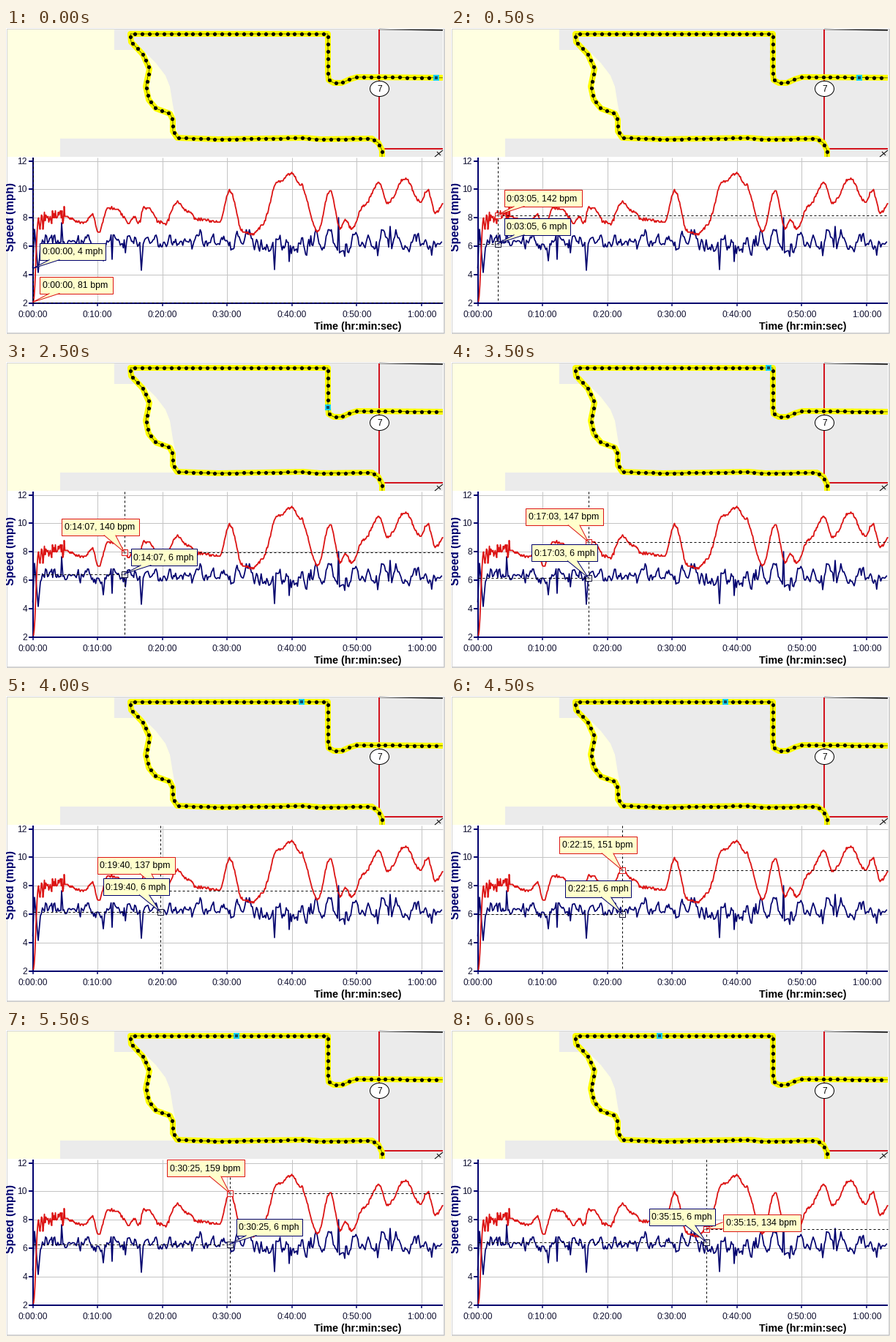
A matplotlib script that plays this animation: 600 px wide and 418 px high, repeating every 6.5 s.

```python
import numpy as np
import matplotlib.pyplot as plt
from matplotlib.animation import FuncAnimation
from matplotlib.patches import Ellipse, Polygon, Rectangle

W, H, DPI = 600, 418, 100
PX = 72 / DPI
NAVY, RED, GRID, NOTE, INK = "#00006e", "#dc1414", "#c4c4c4", "#ffffcc", "#101030"
LEFT, RIGHT, TOP, BASE = 36.5, 597, 177, 376
PER_MIN, PER_MPH = 8.858, 19.44

plt.rcParams["font.family"] = "Liberation Sans"
fig = plt.figure(figsize=(W / DPI, H / DPI), dpi=DPI, facecolor="white")
ax = fig.add_axes([0, 0, 1, 1])
ax.set_xlim(0, W)
ax.set_ylim(H, 0)
ax.axis("off")


def line(xs, ys, color, width=1.0, z=2, **kw):
    kw.setdefault("solid_capstyle", "butt")
    return ax.plot(xs, ys, color=color, lw=width * PX, zorder=z, **kw)[0]


def rect(x, y, w, h, face, edge="none", z=1):
    return ax.add_patch(Rectangle((x, y), w, h, facecolor=face, edgecolor=edge,
                                  lw=PX, zorder=z))


def text(x, y, s, size, color="black", z=6, **kw):
    return ax.text(x, y, s, fontsize=size * PX, color=color, zorder=z, **kw)


def time_x(sec):
    return LEFT + sec / 60 * PER_MIN


def speed_y(mph):
    return BASE - (mph - 2) * PER_MPH


def pulse_y(bpm):
    return BASE - (bpm - 80) * PER_MPH / 10


def eased(x, keys):
    """Cosine easing from one turning point to the next."""
    kx, ky = np.array(sorted(keys)).T
    i = np.clip(np.searchsorted(kx, x) - 1, 0, len(kx) - 2)
    t = np.clip((x - kx[i]) / (kx[i + 1] - kx[i]), 0, 1)
    return ky[i] + (ky[i + 1] - ky[i]) * (1 - np.cos(np.pi * t)) / 2


# Cursor stops: seconds, heart rate, speed, side of each note.
STOPS = [(0, 81, 4.45, "right", "right"), (185, 142, 6.2, "right", "right"),
         (370, 141, 6.4, "right", "right"), (555, 142, 6.17, "left", "right"),
         (700, 147, 6.3, "left", "right"), (847, 140, 6.46, "left", "right"),
         (935, 141, 6.2, "left", "right"), (1023, 147, 6.17, "left", "left"),
         (1180, 137, 6.17, "left", "left"), (1335, 151, 6.06, "left", "left"),
         (1532, 139, 6.73, "left", "right"), (1825, 159, 6.3, "left", "right"),
         (2115, 134, 6.46, "beside", "left")]

rng = np.random.default_rng(5)

# Heart rate: eased turning points with a small jitter in whole beats.
TURNS = [(37.5, 374), (44, 264), (80, 258), (107, 266), (126, 280), (154, 248),
         (167, 267), (182, 266), (194, 246), (217, 267), (247, 249), (272, 262),
         (291, 266), (324, 279), (337, 282), (372, 210), (391, 199), (402, 214),
         (426, 277), (443, 222), (457, 273), (464, 262), (472, 274), (489, 243),
         (510, 211), (521, 239), (546, 206), (566, 238), (576, 222), (587, 252),
         (598, 241)]
bx = np.arange(LEFT + 1, RIGHT + 1)
by = eased(bx, TURNS + [(time_x(s[0]), pulse_y(s[1])) for s in STOPS[3:]])
by += rng.normal(0, 1, len(bx)) * np.where((bx > 44) & (bx < 80), 7, 1)
step = PER_MPH / 10
by = BASE - step * np.round((BASE - by) / step)

# Speed: quick noise over a slow wander that grows later, plus a few spikes.
SPIKES = [(39, 275), (44, 334), (76, 266), (133, 318), (145, 316), (185, 331),
          (367, 330), (387, 319), (454.5, 259), (463, 312), (508, 311),
          (525, 271)]
pins = np.array(SPIKES + [(time_x(s[0]), speed_y(s[2])) for s in STOPS])
sx = np.arange(47, RIGHT, 1.4)
sx = sx[np.abs(sx[:, None] - pins[:, 0]).min(axis=1) > 1]
quick = np.convolve(rng.laplace(0, 5.5, len(sx)), [0.2, 0.6, 0.2], "same")
slow = np.convolve(rng.normal(0, 1, len(sx)), np.hanning(9) / 1.7, "same")
sy = 291.5 + np.clip(quick + slow * np.interp(sx, [300, 380], [3, 8]), -16, 19)
sx, sy = np.append(sx, pins[:, 0]), np.append(sy, pins[:, 1])
order = np.argsort(sx)
sx, sy = sx[order], sy[order]

# Map
rect(1, 1, 596, 175, "#ebebeb", z=0)
ax.add_patch(Polygon([(1, 1), (148, 1), (148, 30), (187, 30), (205, 48),
                      (218, 65), (224, 80), (228, 105), (232, 125),
                      (234, 151), (74, 151), (74, 176), (1, 176)],
                     facecolor="#ffffe1", zorder=1))
line([510, RIGHT], [1.5, 3], "black", 1.5)
line([510, 510, RIGHT], [1, 165, 165], "#d2141e", 2)
line([586, 597], [176, 167], "black", 1)
line([589, 594], [169, 174], "black", 1)

ROUTE = [(600, 68), (480, 67), (470, 70), (459, 75), (448, 75), (441, 71),
         (440, 62), (440, 8), (170, 8), (171, 19), (187, 36), (196, 56),
         (191, 80), (195, 98), (205, 110), (224, 117), (228, 125), (228, 141),
         (234, 150), (290, 152), (407, 150), (430, 152), (500, 151),
         (509, 157), (514, 167), (514, 176)]
rx, ry = np.array(ROUTE, float).T
dist = np.concatenate([[0], np.cumsum(np.hypot(np.diff(rx), np.diff(ry)))])


def dot_at(i):
    s = 12 + 9.93 * i
    return np.interp(s, dist, rx), np.interp(s, dist, ry)


map_clip = Rectangle((1, 1), 596, 175, transform=ax.transData)
dots = np.transpose(dot_at(np.arange(int((dist[-1] - 12) / 9.93) + 1)))
for part in (line(rx, ry, "#ffff00", 8, 3, solid_joinstyle="round"),
             line(rx, ry, "black", 0.6, 4),
             line(dots[:, 0], dots[:, 1], "black", 0, 5, ls="", marker="o",
                  ms=5.2 * PX, mew=0)):
    part.set_clip_path(map_clip)
ax.add_patch(Ellipse((510.5, 83), 26, 21, facecolor="white",
                     edgecolor="black", lw=PX, zorder=6))
text(510.5, 87, "7", 12, ha="center", z=7)

# Chart
for mph in range(2, 13, 2):
    y = speed_y(mph)
    if mph > 2:
        line([LEFT, RIGHT], [y, y], GRID)
    line([31, LEFT], [y, y], NAVY, 2)
    text(29, y + 4, str(mph), 12, INK, ha="right")
for ten in range(7):
    x = time_x(ten * 600)
    if ten:
        line([x, x], [TOP, BASE], GRID)
    line([x, x], [BASE, 380], NAVY, 1.5)
    text(x, 395, f"{ten // 6}:{ten % 6}0:00", 12, INK, ha="center")
line([LEFT, LEFT], [TOP, BASE + 1], NAVY, 2, 3)
line([LEFT - 1, RIGHT], [BASE, BASE], NAVY, 2, 3)
text(421, 412, "Time (hr:min:sec)", 14.2, weight="bold")
text(7, 258, "Speed (mph)", 15.5, NAVY, weight="bold", rotation=90,
     ha="center", va="center")
line(sx, sy, NAVY, 1.7, 4, solid_joinstyle="round")
line(bx, by, RED, 1.8, 4, solid_joinstyle="round")

# Panel edge
line([0.5, 0.5, 598], [416, 0.5, 0.5], "#d4d4d4")
line([598.5, 598.5, 1], [1, 416.5, 416.5], "#c4c4c4", 1.5)

live = []


def keep(*parts):
    live.extend(parts)


def dashed(xs, ys):
    keep(line(xs, ys, "black", 1, 8, dashes=(3, 3), dash_capstyle="butt"))


def handle(x, y, color):
    keep(rect(x - 4, y - 4, 8, 8, "white", color, 9),
         line([x - 3, x + 3], [y, y], "black", 1, 10, dashes=(1, 1)),
         line([x, x], [y - 3, y + 3], "black", 1, 10, dashes=(1, 1)))


def callout(px, py, side, width, label, color, z):
    """Note with a pointer to (px, py)."""
    if side == "left":
        x, y = max(39.5, px - width / 2 - 33), py - 46
        foot = [(x + width * 0.55, y + 23), (x + width * 0.7, y + 23)]
    elif side == "right":
        x, y = px + 9, py - 35
        foot = [(x + 14, y + 23), (x + 28, y + 23)]
    else:
        x, y = px + 23, py - 20
        foot = [(x, y + 11), (x, y + 20)]
    tail = Polygon([foot[0], (px, py), foot[1]], facecolor=NOTE,
                   edgecolor="none", zorder=z + 0.1)
    keep(rect(x, y, width, 23, NOTE, color, z), ax.add_patch(tail),
         line(*zip(foot[0], (px, py), foot[1]), color, 1, z + 0.2),
         text(x + 4, y + 16, label, 12.4, z=z + 0.3))


def draw(k):
    while live:
        live.pop().remove()
    sec, bpm, mph, pulse_side, speed_side = STOPS[k]
    x, sy_now, py_now = (np.floor(v) + 0.5
                         for v in (time_x(sec), speed_y(mph), pulse_y(bpm)))
    clock = f"{sec // 3600}:{sec // 60 % 60:02d}:{sec % 60:02d}"

    # The marker moves three dots per stop and skips one in the bend.
    mx, my = dot_at(3 * k + (k > 3))
    keep(rect(mx - 4, my - 4, 8, 8, "#14d2f0", z=6),
         rect(mx - 2, my - 2, 4, 4, "#104860", z=7))

    dashed([x, x], [TOP, BASE])
    dashed([LEFT, x], [sy_now, sy_now])
    dashed([x, RIGHT], [py_now, py_now])
    if k:
        handle(x, sy_now, INK)
        handle(x, py_now, RED)
    callout(x, py_now, pulse_side, 106 if bpm > 99 else 100,
            f"{clock}, {bpm} bpm", RED, 11)
    callout(x, sy_now, speed_side, 90, f"{clock}, {mph:.0f} mph", NAVY, 12)
    return live


anim = FuncAnimation(fig, draw, frames=len(STOPS), init_func=lambda: [],
                     interval=500, repeat=True, repeat_delay=0, blit=False)
plt.show()
```
